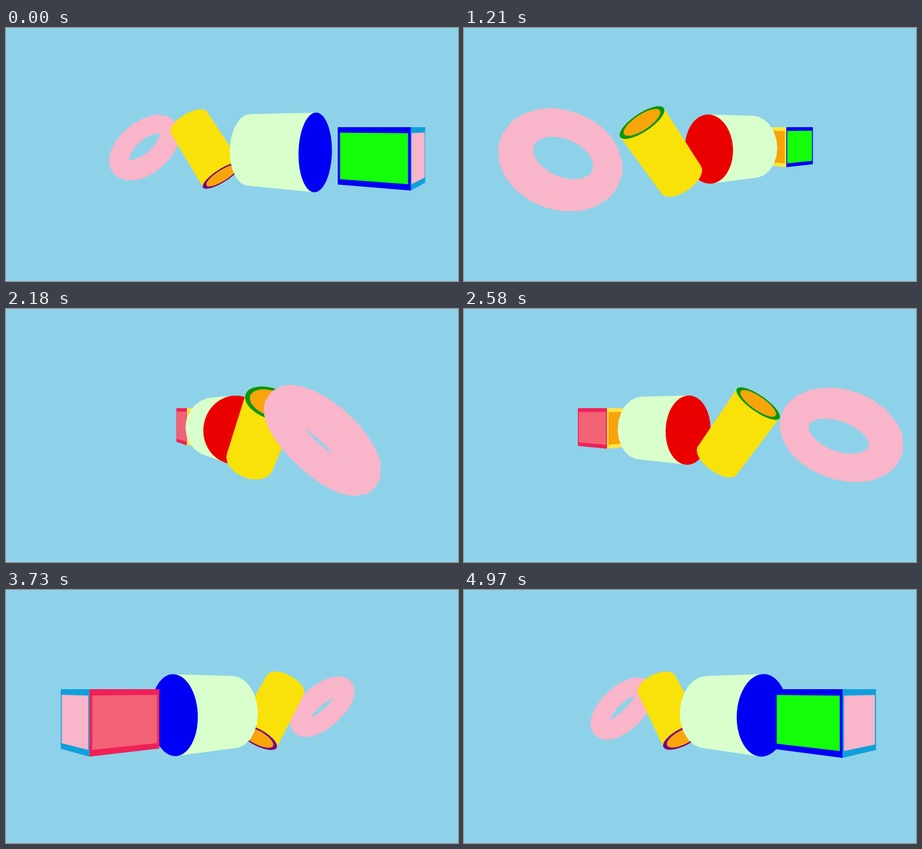
Write an HTML page with a canvas that moves like this. It is 800x449 px and loops after 5 s.

```html
<!DOCTYPE html>
<html lang="en">
<head>
<meta charset="utf-8">
<title>Turning solids</title>
<style>
  html, body { margin: 0; width: 100%; height: 100%; overflow: hidden; background: #8ed2ea; }
  canvas { display: block; }
</style>
</head>
<body>
<canvas id="stage" width="800" height="449"></canvas>
<script>
const ctx = document.getElementById('stage').getContext('2d');
const LOOP = 5000;
const BG = '#8ed2ea', PINK = '#f9b5c9', ORANGE = '#f8a50c', BLUE = '#0000f5';

// Camera: focal length, distance to the turning axis, vanishing point.
const FOCAL = 729, DIST = 9.02, VX = 415.5, VY = 176;
const SIDES = 24;
let sin = 0, cos = 1;

// Points are [u, v, h]: along the row, across it, down from eye level.
const add = (p, q, k = 1) => p.map((c, i) => c + q[i] * k);
const dot = (p, q) => p[0] * q[0] + p[1] * q[1] + p[2] * q[2];

function project([u, v, h]) {
  const s = FOCAL / (DIST - u * sin - v * cos);
  return [VX + s * (u * cos - v * sin), VY + s * h];
}

function faces(point, normal) {
  return dot(normal, add([DIST * sin, DIST * cos, 0], point, -1)) > 0;
}

// Fills the union of polygons as one shape, all wound the same way.
function fill(color, polys) {
  ctx.beginPath();
  for (const poly of polys) {
    const pts = poly.map(project);
    let area = 0;
    pts.forEach(([x, y], i) => {
      const [x2, y2] = pts[(i + 1) % pts.length];
      area += x * y2 - x2 * y;
    });
    if (area < 0) pts.reverse();
    pts.forEach(([x, y], i) => i ? ctx.lineTo(x, y) : ctx.moveTo(x, y));
    ctx.closePath();
  }
  ctx.fillStyle = color;
  ctx.fill();
}

function ring(center, e1, e2, r, n = SIDES) {
  return Array.from({ length: n }, (_, i) => {
    const a = i / n * 2 * Math.PI;
    return add(add(center, e1, r * Math.cos(a)), e2, r * Math.sin(a));
  });
}

// Quads between two rings with the same number of points.
function band(a, b) {
  return a.map((p, i) => {
    const j = (i + 1) % a.length;
    return [p, a[j], b[j], b[i]];
  });
}

// caps: for each end a list of [relative radius, colour].
function cylinder(from, to, r, color, caps) {
  const d = add(to, from, -1);
  const axis = d.map(c => c / Math.hypot(...d));
  const e1 = [axis[2], 0, -axis[0]], e2 = [0, 1, 0];
  const a = ring(from, e1, e2, r), b = ring(to, e1, e2, r);
  fill(color, [...band(a, b), a, b]);
  [[from, -1], [to, 1]].forEach(([center, side], i) => {
    if (!faces(center, axis.map(c => c * side))) return;
    for (const [k, tint] of caps[i]) fill(tint, [ring(center, e1, e2, r * k, 72)]);
  });
}

function torus(center, tilt, R, r) {
  const e1 = [1, 0, 0];
  const e2 = [0, Math.sin(tilt), Math.cos(tilt)];
  const n = [0, Math.cos(tilt), -Math.sin(tilt)];
  const tubes = ring([0, 0, 0], e1, e2, 1).map(out => ring(add(center, out, R), out, n, r, 16));
  fill(PINK, tubes.flatMap((tube, i) => band(tube, tubes[(i + 1) % SIDES])));
}

function box(u1, u2, b) {
  const mx = 0.043, my = 0.095;
  const sides = [
    [[u1, b], [u2, b], [0, 1, 0], BLUE, '#14ff0a'],
    [[u2, b], [u2, -b], [1, 0, 0], '#0fa0dc', PINK],
    [[u2, -b], [u1, -b], [0, -1, 0], '#f02058', '#f26275'],
    [[u1, -b], [u1, b], [-1, 0, 0], '#ffe640', '#f8a30a']
  ];
  for (const [p, q, normal, frame, panel] of sides) {
    if (!faces([...p, 0], normal)) continue;
    const len = Math.hypot(q[0] - p[0], q[1] - p[1]);
    const rect = (x, y) => {
      const at = (k, h) => [p[0] + (q[0] - p[0]) * k, p[1] + (q[1] - p[1]) * k, h];
      const k = x / len;
      return [at(k, y), at(1 - k, y), at(1 - k, 1 - y), at(k, 1 - y)];
    };
    fill(frame, [rect(0, 0)]);
    fill(panel, [rect(mx, my)]);
  }
}

const row = [
  () => torus([-3.07, 0, 0.5], 41 * Math.PI / 180, 0.775, 0.255),
  () => cylinder([-1.5, 0, -0.1], [-0.507, 0, 1.1], 0.505, '#f9e10a', [
    [[1, '#0a960a'], [0.82, ORANGE]],
    [[1, '#780082'], [0.82, ORANGE]]
  ]),
  () => cylinder([0.265, 0, 0.489], [1.79, 0, 0.489], 0.773, '#d9ffcc', [
    [[1, '#eb0000']],
    [[1, BLUE]]
  ]),
  () => box(2.44, 3.645, 0.56)
];

// Steady turn, a little slower at the start of the loop.
const angle = t => Math.min(34.7 - 0.0387 * t, 44.7 - 0.072 * t) * Math.PI / 180;

function draw(t) {
  const a = angle(t);
  sin = Math.sin(a);
  cos = Math.cos(a);
  ctx.fillStyle = BG;
  ctx.fillRect(0, 0, 800, 449);
  const order = sin > 0 ? row : [...row].reverse();
  order.forEach(paint => paint());
}

const start = performance.now();
function tick() {
  draw((performance.now() - start) % LOOP);
  requestAnimationFrame(tick);
}
tick();
</script>
</body>
</html>
```
